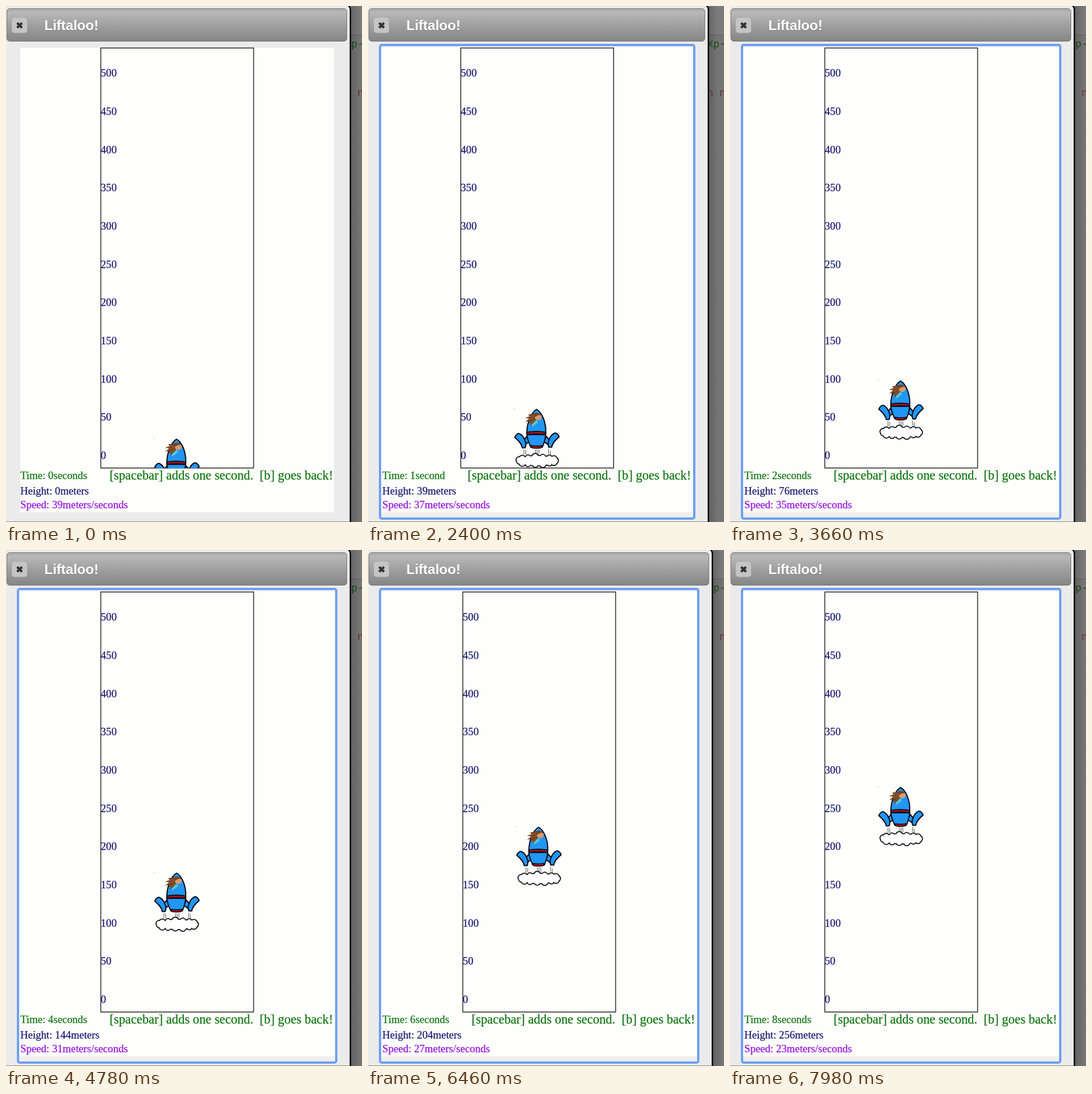
An HTML page for the animation above (8 s loop, 622 by 900 pixels).

```html
<!DOCTYPE html>
<html lang="en">
<head>
<meta charset="utf-8">
<title>Rocket height</title>
<style>
  html, body { margin: 0; width: 100%; height: 100%; overflow: hidden; background: #777; }
  svg { display: block; width: 100%; height: 100%; }
  text { white-space: pre; }
  .serif { font: 18.67px "Liberation Serif", "Times New Roman", serif; stroke-width: .25; }
  .navy { fill: #191970; stroke: #191970; }
  .green { fill: #107510; stroke: #107510; }
  .purple { fill: #9410e0; stroke: #9410e0; }
  .mono { font: 18px "Liberation Mono", monospace; }
  .title { font: bold 24px "Liberation Sans", Arial, sans-serif; }
  .ink { stroke: #0a0a14; stroke-width: 2; stroke-linejoin: round; stroke-linecap: round; }
</style>
</head>
<body>
<svg viewBox="0 0 622 900" preserveAspectRatio="none">
  <defs>
    <linearGradient id="bar" x2="0" y2="1">
      <stop offset="0" stop-color="#a9a9a9"/><stop offset=".12" stop-color="#b8b8b8"/>
      <stop offset=".5" stop-color="#a0a0a0"/><stop offset="1" stop-color="#858585"/>
    </linearGradient>
    <linearGradient id="shade">
      <stop offset="0" stop-color="#000" stop-opacity=".16"/><stop offset="1" stop-color="#000" stop-opacity="0"/>
    </linearGradient>
    <clipPath id="sky"><rect x="165" y="73" width="268" height="733"/></clipPath>
    <clipPath id="scrolled"><rect y="73" width="622" height="827"/></clipPath>
  </defs>

  <rect width="622" height="900" fill="#7b7b7b"/>
  <rect y="50" width="622" height="850" fill="#757575"/>
  <path d="M590 50.5H622" stroke="#626262"/>
  <text class="mono" x="592.5" y="72" fill="#145014">Xp-</text>
  <text class="mono" x="592.5" y="157" fill="#70302b">n n</text>

  <g class="right"><rect x="603" width="16" height="900" fill="url(#shade)"/></g>
  <rect class="wide" x="-12" y="-3" width="615" height="930" rx="9" fill="#050505"/>
  <rect class="wide" x="-12" y="-1" width="612.5" height="930" rx="7" fill="#ebebeb"/>
  <rect class="wide" y="899" width="601" height="1" fill="#888"/>

  <rect class="wide" x="1.5" y="4.5" width="594" height="57" rx="5" fill="url(#bar)" stroke="#777"/>
  <rect x="10" y="20" width="27" height="27" rx="5" fill="#c5c5c5" stroke="#aaa" stroke-width=".7"/>
  <path d="M19.5 29.5l8.5 8.5m0-8.5l-8.5 8.5" stroke="#333" stroke-width="4.2"/>
  <text class="title" x="67" y="43" fill="#666" opacity=".6">Liftaloo!</text>
  <text class="title" x="67" y="42" fill="#fff">Liftaloo!</text>

  <g id="ring">
    <rect class="wide" x="21" y="68" width="556" height="826" rx="3" fill="#f0f0ed" stroke="#709ff0" stroke-width="4"/>
    <rect class="wide" x="23" y="72" width="552" height="811" fill="#fdfdfa"/>
  </g>
  <rect class="wide" x="25" y="73" width="548" height="810" fill="#fefefc"/>

  <g class="middle">
    <rect x="165.6" y="73.3" width="267" height="732.5" fill="none" stroke="#343434" stroke-width="1.6"/>
    <g id="scale" class="serif navy"></g>
    <g clip-path="url(#sky)">
      <g id="rocket">
        <circle cx="-39" r=".7" fill="#999"/>
        <path d="M-22 71v9M-19 72v8M-2 71v9M1 71v8M4 71v8M21 70v9M24 73v8" stroke="#555" stroke-width="1"/>
        <g id="cloud"></g>
        <g class="ink" fill="#2196f3">
          <path d="M-17 48C-20 52-22 55-24 54L-21 63C-17 61-14 57-12 58ZM17 48C20 52 22 55 24 54L21 63C17 61 14 57 12 58Z"/>
          <path id="fin" d="M-38 50C-36 45-32 42-29 44C-25 46-22 50-20 56C-18 61-18 64-20 68L-25 68C-26 61-31 56-38 50Z"/>
          <use href="#fin" transform="translate(1.5 -1) scale(-1 1)"/>
          <path d="M-17 45C-16 54-13 61-10 67Q0 70 10 67C13 61 15 54 16 45Z"/>
          <path d="M0 1C9 6 17 23 16 42Q0 39-17 42C-17 24-9 6 0 1Z"/>
          <path d="M-17 41Q0 38 16 41L16 45Q0 43-17 45Z" fill="#b51218"/>
          <path d="M-10 64Q0 66 10 64L8 68Q0 70-8 68Z" fill="#b51218" stroke-width="1.5"/>
        </g>
        <path d="M-9 27Q-6 20 0 20L3 23Q-1 28-8 31Z" fill="#54c3d8"/>
        <path d="M6 9Q0 5-6 9L-15 10L-12 13L-20 16L-13 17L-20 23L-12 21L-15 27L-10 24L-11 30L-4 23Q1 18 6 9Z" fill="#744421"/>
        <path d="M-14 14L-4 12M-13 19L-4 15M-9 25L-3 18" stroke="#a46a3d" fill="none"/>
        <ellipse cx="3" cy="14.5" rx="6" ry="5.5" fill="#d99a70"/>
        <path d="M-4 15Q-2 8 5 8L9 11L3 11Z" fill="#744421"/>
      </g>
    </g>
  </g>

  <g class="serif">
    <text id="time" class="green" x="25" y="825"></text>
    <text id="height" class="navy" x="25" y="851.5"></text>
    <text id="speed" class="purple" x="25" y="875.5"></text>
  </g>
  <text class="serif green right" x="181" y="826" style="font-size:22.4px">[spacebar] adds one second.  [b] goes back!</text>
</svg>
<script>
const LOOP = 8000, FOCUS_AT = 960, FIRST_PRESS = 2080, PRESS_GAP = 840;
const $ = id => document.getElementById(id);
const all = name => [...document.querySelectorAll(name)];

function add(parent, tag, attrs, content = "") {
  const el = document.createElementNS("http://www.w3.org/2000/svg", tag);
  for (const key in attrs) el.setAttribute(key, attrs[key]);
  el.textContent = content;
  parent.append(el);
}

for (let h = 0; h <= 500; h += 50)
  add($("scale"), "text", { x: 165.5, y: 790 - h * 4 / 3 }, h);

// Dark puffs, then smaller white ones that leave only the outline.
for (const [inset, fill] of [[0, "#111"], [1.8, "#fff"]]) {
  add($("cloud"), "ellipse", { cx: 1, cy: 90.5, rx: 33 - inset, ry: 10 - inset, fill });
  for (let i = 0; i < 15; i++) {
    const a = i / 15 * Math.PI * 2;
    add($("cloud"), "circle", {
      cx: 1 + 32 * Math.cos(a), cy: 90.5 + 6.5 * Math.sin(a),
      r: 6.2 + 0.8 * Math.sin(i * 2.4) - inset, fill
    });
  }
}

const wide = all(".wide").map(el => [el, +el.getAttribute("width")]);
const middle = all(".middle"), right = all(".right");
let shown = -1;

function showSecond(s) {
  if (s === shown) return;
  shown = s;
  const height = s * (40 - s), speed = 39 - 2 * s;
  const shift = s === 1 ? -7 : 0; // the singular label makes the dialog narrower
  $("time").textContent = `Time: ${s}second${s === 1 ? "" : "s"}`;
  $("height").textContent = `Height: ${height}meters`;
  $("speed").textContent = `Speed: ${speed}meters/seconds`;
  $("rocket").setAttribute("transform", `translate(298 ${754.5 - height * 4 / 3})`);
  wide.forEach(([el, w]) => el.setAttribute("width", w + shift));
  middle.forEach(el => el.setAttribute("transform", `translate(${shift / 2} 0)`));
  right.forEach(el => el.setAttribute("transform", `translate(${shift} 0)`));
}

function draw(now) {
  const t = now % LOOP;
  showSecond(t < FIRST_PRESS ? 0 : 1 + Math.floor((t - FIRST_PRESS) / PRESS_GAP));
  $("ring").setAttribute("visibility", t < FOCUS_AT ? "hidden" : "visible");
  $("ring").setAttribute("clip-path", t < FIRST_PRESS ? "url(#scrolled)" : "none");
}

const start = performance.now();
function tick() {
  draw(performance.now() - start);
  requestAnimationFrame(tick);
}
tick();
</script>
</body>
</html>
```
